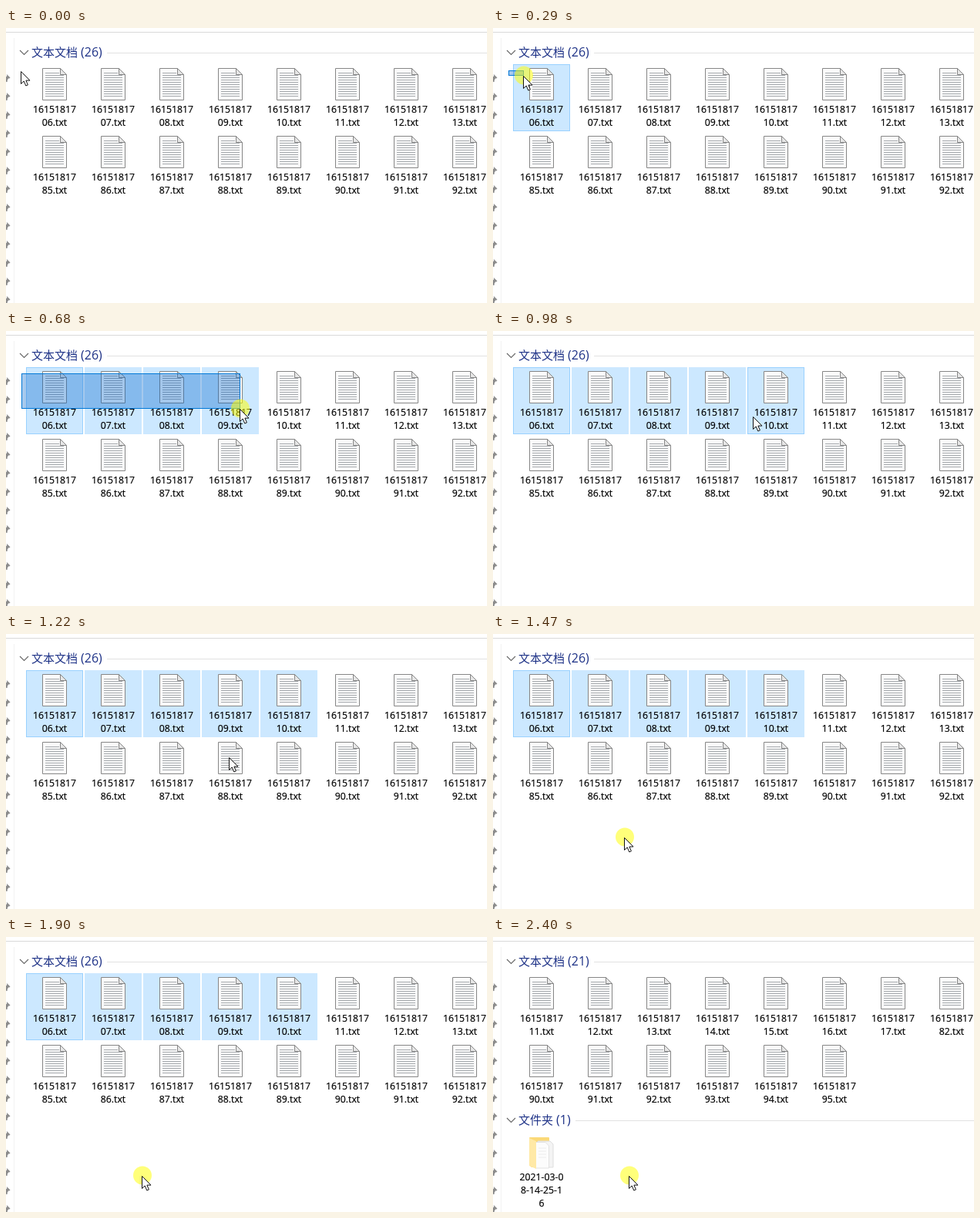
Animation of 624 by 357 pixels, one loop 2780 ms. Source, as an HTML page:

```html
<!DOCTYPE html>
<html lang="zh">
<head>
<meta charset="utf-8">
<title>Selecting text files</title>
<style>
html, body { margin: 0; width: 624px; height: 357px; overflow: hidden; background: #fff; }
svg { display: block; }
text { font: 12.25px "Open Sans", "Noto Sans", sans-serif; text-anchor: middle; }
.name { stroke: #000; stroke-width: .2; }
.head { font-size: 16px; fill: #1e3287; text-anchor: start; }
.cjk { font: 15px "Noto Sans CJK SC", "Noto Sans CJK", sans-serif; }
.sel { fill: #cce8ff; }
.edge { fill: none; stroke: #99d1ff; }
</style>
</head>
<body>
<svg id="stage" width="624" height="357" viewBox="0 0 624 357">
  <defs>
    <g id="doc">
      <path d="M.5 .5H23.5L31.5 8.5V41.5H.5Z" fill="#fbfbfb" stroke="#868686"/>
      <path d="M23.5 .5V8.5H31.5Z" fill="#e6e6e6" stroke="#868686"/>
      <path id="rules" stroke="#a2a6aa"/>
    </g>
    <path id="pin" d="M1 -5L5.500 -.5L4.500 .5L3.500 .3L1.800 2.500L1.800 4.500L.8 5.300L-4 .5L-3 -.5L-1 -.5L1.200 -2.800Z" fill="#8c8c8c"/>
  </defs>

  <path d="M0 5.5H624" stroke="#d9d9d9"/>
  <path d="M10.5 13V357" stroke="#f2f2f2"/>
  <g id="pins"></g>

  <g id="before"></g>
  <g id="after">
    <g id="plainFolder">
      <path d="M48 262Q48 260 50 260H58L61 263H76Q78 263 78 265V299H48Z" fill="#f5cf69"/>
      <path d="M48 266H78V299Q78 300 77 300H49Q48 300 48 299Z" fill="#ffe391"/>
    </g>
    <g id="fullFolder">
      <path d="M47 261Q47 260 48 260H72Q73 260 73 261V299H50L47 296Z" fill="#fbd978"/>
      <path d="M58 265H74L78 269V299H58Z" fill="#f4f4f4" stroke="#dedede"/>
      <path d="M55.500 266.500H68L72.500 271V300H55.500Z" fill="#fcfcfc" stroke="#e2e2e2"/>
      <path d="M59 274H69M59 278H69M59 282H69M59 286H69" stroke="#ececec"/>
      <path d="M47 261L56 265V301L47 297Z" fill="#ffe9a6"/>
    </g>
  </g>

  <rect id="marquee" x="20.5" y="55.5" fill="#0066cc" fill-opacity=".35" stroke="#0078d7"/>
  <g id="mouse">
    <circle id="glow" r="12" cy="-.5" fill="#ff0" fill-opacity=".52"/>
    <path d="M-.5 .5V16.500L3.200 13L5.800 19L8.400 17.900L5.900 12.100H11Z" fill="#fff" stroke="#111"/>
  </g>
</svg>
<script>
const LOOP = 2780, COLS = 8, PITCH = 76, ROW = 88;
const $ = id => document.getElementById(id);

// time, tip x, tip y
const path = [
  [0, 20, 56], [150, 20, 55], [220, 26, 58], [290, 40, 62], [370, 85, 71],
  [450, 150, 81], [530, 215, 90], [600, 268, 97], [680, 304, 101],
  [750, 338, 111], [1080, 325, 125], [1160, 290, 160], [1240, 245, 200],
  [1310, 205, 235], [1390, 176, 258], [1470, 171, 264], [1630, 172, 272],
  [1720, 174, 286], [1810, 176, 300], [1900, 177, 310]
];

const label = (x, y, s) => `<text class="name" x="${x}" y="${y}">${s}</text>`;

function heading(y, name, count) {
  const x = 33 + name.length * 15 + 4;
  const lineX = x + 16 + 9.15 * String(count).length;
  return `<path d="M18 ${y - 3}L23.500 ${y + 2.5}L29 ${y - 3}" fill="none" stroke="#666" stroke-width="1.1"/>
    <text class="head cjk" x="33" y="${y + 5}">${name}</text>
    <text class="head" x="${x}" y="${y + 5}">(${count})</text>
    <path d="M${Math.round(lineX)} ${y + .5}H624" stroke="#e2e2e2"/>`;
}

function file(n, slot) {
  const x = 26 + slot % COLS * PITCH, y = 47 + Math.floor(slot / COLS) * ROW;
  return `<rect class="sel" x="${x}" y="${y}" width="74" height="87" visibility="hidden"/>
    <rect class="edge" x="${x + .5}" y="${y + .5}" width="73" height="86" visibility="hidden"/>
    <use href="#doc" x="${x + 21}" y="${y + 5}"/>
    ${label(x + 37, y + 63, "16151817")}
    ${label(x + 37, y + 80, String(n).padStart(2, "0") + ".txt")}`;
}

const range = (from, n) => Array.from({ length: n }, (_, i) => from + i);
const files = list => list.map(file).join("");

$("rules").setAttribute("d",
  range(0, 11).map(i => `M4 ${6.5 + i * 3}H${i < 1 ? 22 : 28}`).join(""));
$("pins").innerHTML = range(0, 13).map(i => `<use href="#pin" y="${65 + i * 24}"/>`).join("");
$("before").innerHTML = heading(32, "文本文档", 26) + files([...range(6, 8), ...range(85, 8)]);
$("after").insertAdjacentHTML("afterbegin",
  heading(32, "文本文档", 21) + files([...range(11, 7), 82, ...range(90, 6)]) +
  heading(238, "文件夹", 1) +
  ["2021-03-0", "8-14-25-1", "6"].map((s, i) => label(63, 316 + i * 17, s)).join(""));

const sels = $("before").querySelectorAll(".sel");
const edges = $("before").querySelectorAll(".edge");
const show = (el, on) => el.setAttribute("visibility", on ? "visible" : "hidden");
const display = (el, on) => { el.style.display = on ? "" : "none"; };

function draw(t) {
  const [, x, y] = path.findLast(p => p[0] <= t);
  const dragging = t >= 220 && t < 920;
  const picked = t < 220 ? 0 : t >= 750 ? 5
    : range(0, 5).filter(i => x >= 32 + i * PITCH).length;

  $("mouse").setAttribute("transform", `translate(${x} ${y})`);
  display($("glow"), t >= 150 && t < 980 || t >= 1470);

  display($("marquee"), dragging);
  $("marquee").setAttribute("width", Math.max(0, x - 21));
  $("marquee").setAttribute("height", Math.max(0, y - 56));

  display($("before"), t < 2230);
  display($("after"), t >= 2230);
  display($("plainFolder"), t < 2400);
  display($("fullFolder"), t >= 2400);
  for (let i = 0; i < 5; i++) {
    const hover = i === 4 && t >= 920 && t < 1080;
    show(sels[i], i < picked);
    show(edges[i], i < picked && (i === 0 || hover));
  }
}

const start = performance.now();
function tick() {
  draw((performance.now() - start) % LOOP);
  requestAnimationFrame(tick);
}
tick();
</script>
</body>
</html>
```
